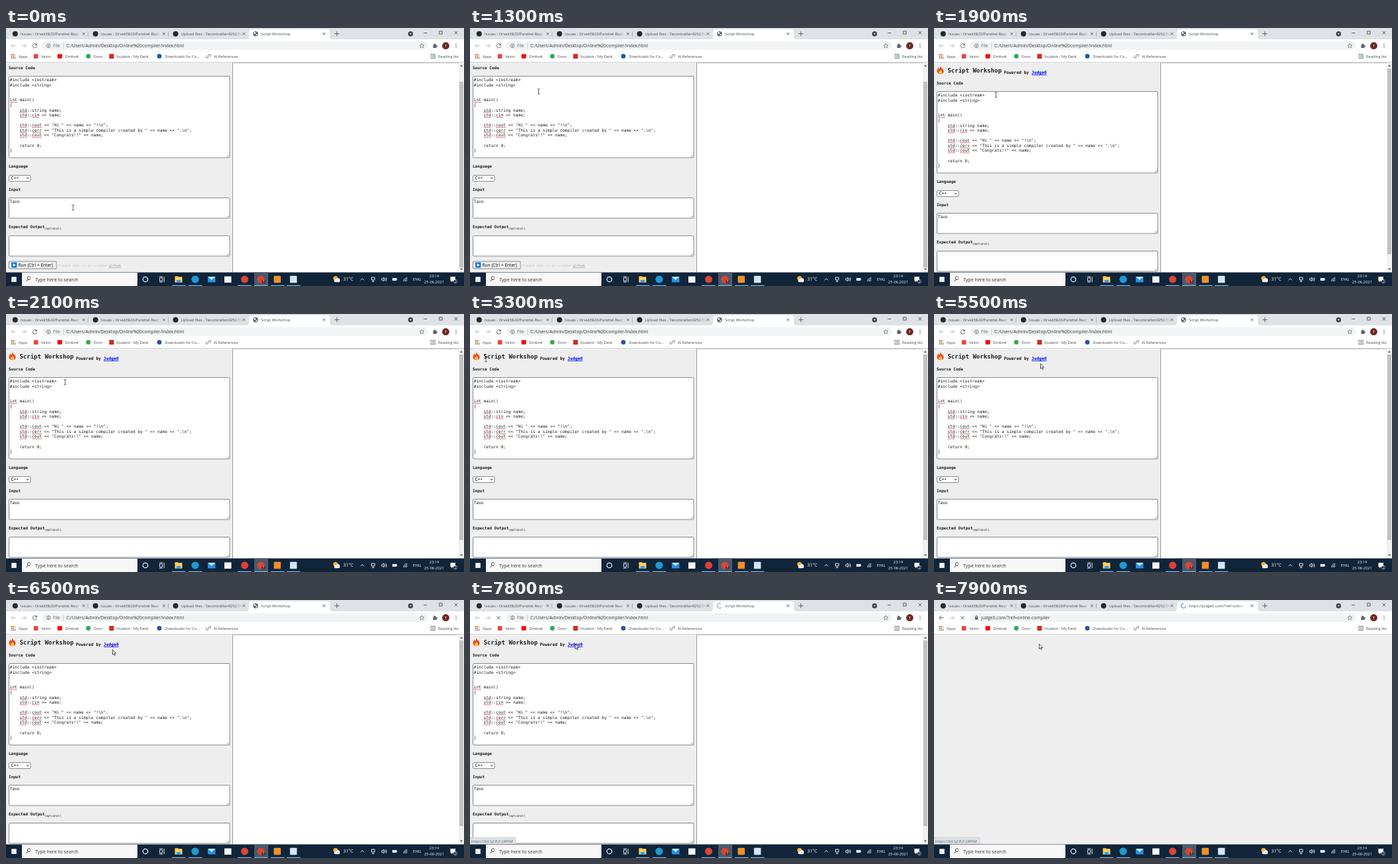
Animation, 690 px wide and 388 px high, one loop 8 s. Source, as an HTML page:

```html
<!DOCTYPE html>
<html lang="en">
<head>
<meta charset="utf-8">
<title>Script Workshop</title>
<style>
html, body { margin: 0; width: 100%; height: 100%; overflow: hidden; background: #fff; }
svg { display: block; width: 690px; height: 388px; }
text { font-family: "Open Sans", "Noto Sans", sans-serif; font-size: 5.78px; fill: #45494d; }
.url { font-size: 6.72px; fill: #333639; }
.mono { font-family: "DejaVu Sans Mono", "Noto Sans Mono", monospace; font-size: 6.16px; fill: #1c1c1c; }
.label { font-size: 6.03px; font-weight: bold; }
.line { fill: none; stroke: #5f6368; stroke-width: 1; }
.box { fill: #fff; stroke: #8a8a8a; stroke-width: 1; }
.tray { fill: #f2f5f8; }
.tray-line { fill: none; stroke: #f2f5f8; stroke-width: .9; }
</style>
</head>
<body>
<svg id="stage" viewBox="0 0 690 388">
  <defs>
    <linearGradient id="fadeTab"><stop offset="0" stop-color="#dee1e6" stop-opacity="0"/><stop offset="1" stop-color="#dee1e6"/></linearGradient>
    <linearGradient id="fadeActive"><stop offset="0" stop-color="#fff" stop-opacity="0"/><stop offset="1" stop-color="#fff"/></linearGradient>
    <clipPath id="view"><rect y="52" width="690" height="315.5"/></clipPath>
  </defs>
</svg>
<script>
const LOOP = 8000, STEP = 100, SCROLL = 23;
const HOVER = 7300, LOAD = 7500, NAVIGATE = 7900;

// Pointer hotspot: time, x, y
const POINTER = [
  [0, 101, 270], [300, 101, 270], [1000, 104, 100], [1300, 103.5, 95.5],
  [1600, 101, 97], [2100, 89, 102.5], [2500, 78, 100], [3000, 26, 70],
  [3300, 24, 68], [3800, 30, 66], [4700, 130, 68], [5300, 160.5, 74.8],
  [7000, 160.5, 74.8], [7400, 158.5, 66.2], [8000, 158.5, 66.2]
];
const WHEEL = [[0, SCROLL], [1500, SCROLL], [1800, 0], [LOOP, 0]];

const rect = (x, y, w, h, fill, r = 0, more = '') =>
  `<rect x="${x}" y="${y}" width="${w}" height="${h}" rx="${r}" fill="${fill}" ${more}/>`;
const dot = (x, y, r, fill, more = '') => `<circle cx="${x}" cy="${y}" r="${r}" fill="${fill}" ${more}/>`;
const line = (d, more = '') => `<path class="line" d="${d}" ${more}/>`;
const trayLine = d => `<path class="tray-line" d="${d}"/>`;
const shape = (d, fill, more = '') => `<path d="${d}" fill="${fill}" ${more}/>`;
const group = (id, body, more = '') => `<g id="${id}" ${more}>${body}</g>`;
const text = (x, y, s, cls = '', more = '') =>
  `<text x="${x}" y="${y}" class="${cls}" ${more}>${s.replace(/&/g, '&amp;').replace(/</g, '&lt;')}</text>`;
const mono = (x, y, s, more = '') => text(x, y, s, 'mono', more);
const label = (y, s) => text(4, y, s, 'mono label');
const cross = (x, y, r, more) => line(`M${x - r} ${y - r}l${2 * r} ${2 * r}m0 ${-2 * r}l${-2 * r} ${2 * r}`, more);

function tab(x, title, end) {
  return dot(x, 8.7, 4, '#24292e') + text(x + 8.3, 11, title) +
    rect(end - 15, 3, 12, 12, 'url(#fadeTab)') + rect(end - 3, 3, 9, 12, '#dee1e6') +
    cross(end, 8.7, 1.8, 'stroke-width=".8"') +
    (end < 300 ? rect(end + 6, 5, .6, 8, '#8a8e94') : '');
}

function tabs() {
  return rect(0, 0, 690, 17, '#dee1e6') +
    tab(13.8, 'Issues - Orvek5820/Pandrel-Rear', 117) +
    tab(134.8, 'Issues - Orvek5820/Pandrel-Rear', 238) +
    tab(255.5, 'Upload files - Tavomirellan4252/Rel', 358.5) +
    shape('M362 17Q366 17 366 13V6Q366 2 370 2H484Q488 2 488 6V13Q488 17 492 17Z', '#fff') +
    group('globe', dot(376, 8.7, 3.7, '#5f6368') +
      shape('M373.4 7.3l2-1.3 1.2 1.2-1.4 1.5-1.5 0zM376.5 9.3l2-.3-.6 2-1.5.6z', '#fff')) +
    group('spin', line('M376 5.2A3.5 3.5 0 1 0 379.5 8.7', 'id="arc"')) +
    text(384, 11, 'Script Workshop', '', 'id="title"') +
    rect(458, 3, 11, 12, 'url(#fadeActive)') + rect(469, 3, 16, 12, '#fff') +
    cross(479, 8.7, 1.8, 'stroke-width=".9"') +
    line('M495 8.7h7m-3.5-3.5v7') +
    dot(609.5, 8.7, 3.7, '#3c4043') + shape('M607.7 7.8h3.6l-1.8 2.4z', '#dee1e6') +
    line('M629.3 7.5h5M652.8 4.8h4.4v4.4h-4.4z', 'style="stroke:#222;stroke-width:.7"') +
    cross(678, 7.2, 2.4, 'style="stroke:#222;stroke-width:.7"');
}

function toolbar() {
  return rect(0, 17, 690, 35, '#fff') + rect(54, 20, 582, 13, '#f1f3f4', 6.5) +
    line('M14.5 26.7h-6.5m3-3l-3 3 3 3', 'id="back"') +
    line('M24 26.7h6.5m-3-3l3 3-3 3', 'style="stroke:#b9bcc0"') +
    group('reload', line('M45.6 24.6A3.1 3.1 0 1 0 46.4 27.4') + shape('M46.8 22.8v3.2h-3.2z', '#5f6368')) +
    group('stop', cross(43, 26.7, 2.7)) +
    group('fileUrl', dot(64, 26.7, 2.8, 'none', 'stroke="#5f6368" stroke-width=".8"') +
      line('M64 26.2v2.1M64 24.7v.8', 'stroke-width=".8"') +
      text(71, 29, 'File', 'url', 'style="fill:#5f6368"') + rect(86.5, 23, .6, 8, '#aeb1b5') +
      text(91, 29, 'C:/Users/Admin/Desktop/Online%20compiler/index.html', 'url')) +
    group('webUrl', rect(61.8, 25.8, 4.4, 3.8, '#5f6368', .5) +
      line('M62.7 26v-1a1.3 1.3 0 0 1 2.6 0v1', 'stroke-width=".8"') +
      text(71, 29, 'judge0.com/?ref=online-compiler', 'url')) +
    line('M626.5 23.3l1 2.2 2.4.2-1.8 1.6.5 2.4-2.1-1.2-2.1 1.2.5-2.4-1.8-1.6 2.4-.2z', 'style="stroke-width:.7"') +
    rect(643.5, 25, 5, 5, '#5f6368', .6) + dot(645.8, 24.6, 1.2, '#5f6368') + dot(648.7, 27.4, 1.2, '#5f6368') +
    dot(662.5, 26.7, 5.4, '#6b2a25') +
    text(662.5, 28.8, 'T', '', 'style="fill:#fff" text-anchor="middle"') +
    [24.2, 26.7, 29.2].map(y => dot(678, y, .75, '#5f6368')).join('');
}

function bookmarks() {
  const grid = ['#ea4335', '#ea4335', '#fbbc05', '#34a853', '#4285f4', '#fbbc05', '#34a853', '#4285f4', '#ea4335'];
  const items = [[53, 'Velmi'], [89, 'Zimbrel'], [132, 'Dorn'], [166, 'Student - My Desk'],
    [239.3, 'Downloads for Co...'], [313, 'AI References'], [651, 'Reading list']];
  return grid.map((c, i) => rect(7.6 + i % 3 * 2.5, 39.2 + (i / 3 | 0) * 2.5, 1.7, 1.7, c)).join('') +
    text(19, 44.6, 'Apps') + items.map(([x, s]) => text(x, 44.6, s)).join('') +
    rect(41.8, 39.3, 6.5, 6.5, '#ea4335') + rect(77.5, 39.2, 7, 6.5, '#f00', 1) +
    dot(124, 42.4, 3.4, '#34a853') + rect(155.5, 39, 7, 7, '#e1251b') + dot(231, 42.4, 3.4, '#2456a6') +
    line('M303.5 43.8l3-3M304.8 41.2l1-1a1.7 1.7 0 0 1 2.4 2.4l-1 1M305.2 43.6l-1 1a1.7 1.7 0 0 1-2.4-2.4l1-1', 'style="stroke-width:.8"') +
    line('M640.2 39.5h6.2v6h-6.2zM642 41.5h3M642 43.5h3', 'style="stroke-width:.8"') +
    rect(0, 51, 690, 1, '#d3d5d8');
}

function source(x, top) {
  const ADV = 3.708, GAP = 7.57;
  const rows = [
    '#include <iostream>', '#include <string>', '', '', 'int main()', '{',
    '    std::string name;', '    std::cin >> name;', '',
    '    std::cout << "Hi " << name << "!\\n";',
    '    std::cerr << "This is a simple compiler created by " << name << ".\\n";',
    '    std::cout << "Congrats!!" << name;', '', '    return 0;', '}'
  ];
  return rows.map((row, i) => {
    const y = top + i * GAP, pad = row.search(/\S|$/);
    const marks = [...row.matchAll(/\b(int|std|cin|cout|cerr)\b/g)]
      .map(m => rect(x + m.index * ADV, y + 1.1, m[0].length * ADV, .7, '#c8474c'));
    return mono(x + pad * ADV, y, row.trim()) + marks.join('');
  }).join('');
}

function area(y, h) {
  return `<rect class="box" x="4.5" y="${y}" width="332.5" height="${h}" rx="1"/>` +
    line(`M332.5 ${y + h - 1}l3.5-3.5M334.5 ${y + h - 1}l1.5-1.5`, 'style="stroke-width:.6"');
}

function page() {
  const left =
    shape('M9.4 57C10 60 14.8 61.5 14.6 65.5C14.4 68 12.2 69.3 9.6 69.3C6.5 69.3 4.5 67.5 4.5 64.8C4.5 62.5 6 61.3 6.2 59.3C7.2 60 7.6 60.9 7.7 61.8C9 60.6 9.5 59 9.4 57Z', '#e8501f') +
    shape('M9.8 62.5C10.2 64 12.4 64.8 12.2 67C12 68.5 11 69 9.6 69C8 69 6.9 68.2 7 66.6C7.1 65.5 7.8 65 8 64.3L8.9 65.2C9.6 64.4 9.9 63.6 9.8 62.5Z', '#fcc33c') +
    mono(20.4, 66.6, 'Script Workshop', 'style="font-size:9.03px;font-weight:bold"') +
    mono(105.2, 69.2, 'Powered by', 'style="font-size:6.3px;font-weight:bold"') +
    mono(147, 69.2, 'Judge0', 'style="font-size:6.3px;font-weight:bold;fill:#00e"') +
    rect(147, 70, 22.7, .8, '#00e') +
    label(85.1, 'Source Code') + area(95.5, 122.5) + source(5.7, 103.1) +
    label(233, 'Language') +
    `<rect class="box" x="4.5" y="244.5" width="32.5" height="9" rx="1"/>` +
    text(7.5, 251.3, 'C++', '', 'style="font-size:6.5px;fill:#000"') +
    line('M31 248l1.6 1.7 1.6-1.7', 'style="stroke:#111"') +
    label(268, 'Input') + area(278.5, 30.5) + mono(5.7, 286, 'Tavo') +
    label(323.5, 'Expected Output') + mono(58, 325.8, '(optional)', 'style="font-size:4.25px"') +
    area(335.5, 30.5) +
    rect(4.5, 374, 71.5, 11, '#efefef', 1, 'stroke="#8a8a8a"') +
    rect(8, 375.5, 8.5, 8, '#1c7bd0', 1) + shape('M10.7 377.2l4 2.3-4 2.3z', '#fff') +
    text(18.5, 382.2, 'Run (Ctrl + Enter)', '', 'style="font-size:6.6px;fill:#111"') +
    mono(80, 382, 'judge0-demo is an example', 'style="font-size:4.8px;fill:#c4c4c4"') +
    mono(155, 382, 'github', 'style="font-size:5px;fill:#999"') + rect(155, 383, 18, .6, '#999');
  return rect(0, 52, 690, 316, '#eee') + group('doc',
    group('scroll', left) +
    rect(341, 52, 341, 315.5, '#fff') + rect(341, 52, 1, 315.5, '#999') + rect(341, 52, 341, .8, '#aaa') +
    rect(682, 52, 8, 315.5, '#f1f1f1') + rect(683, 61, 6, 279, '#c1c1c1', 0, 'id="thumb"') +
    shape('M683.8 58h4.4l-2.2-2.6z', '#555') + shape('M683.8 361.5h4.4l-2.2 2.6z', '#555'));
}

const status = () => rect(-1, 357, 70, 11, '#dee1e6', 1.5, 'stroke="#c4c7cb" stroke-width=".6"') +
  text(2, 364.6, 'https://bit.ly/2UCsWRM', '', 'style="fill:#5f6368"');

function taskbar() {
  const NAVY = '#10243a', LIGHT = '#f2f5f8';
  const running = [250, 275, 349, 374, 399, 423].map(x => rect(x, 386.8, 20.5, 1.2, '#76b9ed')).join('');
  return rect(0, 367.5, 690, 20.5, NAVY) +
    rect(8.2, 374.3, 7.6, 7.6, LIGHT) +
    rect(24, 368, 174, 20, '#f7f7f7') +
    line('M36.9 375.4a2.4 2.4 0 1 0-.1 1.8M33.3 378.2l-2.6 2.8', 'style="stroke:#222;stroke-width:.9"') +
    text(44, 380.6, 'Type here to search', '', 'style="font-size:7.1px;fill:#333"') +
    dot(210, 378, 3.7, 'none', `stroke="${LIGHT}" stroke-width="1.2"`) +
    trayLine('M231.5 375.8h4.2v4.6h-4.2zM231 374h5.2M231 382.2h5.2M238.2 374v8.2') +
    rect(374, 367.5, 21, 20.5, '#4b5a6b') +
    rect(254.5, 373, 5, 3, '#e0a526', .5) + rect(254.5, 374.3, 11, 8.5, '#fbd05f', .5) + rect(257, 379, 6, 3.8, '#3c9be0') +
    dot(285, 378, 5.6, '#1e9bd0') +
    rect(304, 374, 11.5, 8.5, '#2a8fe0', .5) + shape('M304 374h11.5l-5.75 5z', '#bfe4fa') +
    rect(329, 373.5, 10.5, 9.5, LIGHT, .5) +
    dot(359.5, 378, 5.5, '#db4437') + dot(384, 378, 5.5, '#db4437') + dot(388, 381.5, 3, '#6b2a25') +
    text(388, 383.4, 'T', '', 'text-anchor="middle" style="font-size:4.5px;fill:#fff"') +
    rect(403.5, 372.7, 10.5, 10.5, '#f09022', 1) + rect(427.8, 372.7, 10.5, 10.5, '#d5e4f2', 1) + running +
    dot(496.5, 376.3, 3.4, '#f7b52c') + dot(496.5, 380, 2.3, '#e4ebf2') +
    dot(500, 379, 3, '#e4ebf2') + rect(496, 379, 7, 3.3, '#e4ebf2', 1.5) +
    text(508, 380.4, '31°C', 'tray', 'style="font-size:7px"') +
    trayLine('M534.2 379.3l2.6-2.6 2.6 2.6') +
    trayLine('M550.5 375h5v4h-5zM551.5 381.5h3M553 379v2.5') +
    trayLine('M566 376.8h1.4l1.8-1.8v6l-1.8-1.8h-1.4zM570.6 376.3a2.5 2.5 0 0 1 0 3.4M572 375a4 4 0 0 1 0 6') +
    rect(582, 376, 6.5, 4, LIGHT, .4) + rect(588.5, 377.2, .9, 1.6, LIGHT) +
    trayLine('M599 381a5.5 5.5 0 0 1 5.5-5.5M601 381a3.5 3.5 0 0 1 3.5-3.5M603 381a1.5 1.5 0 0 1 1.5-1.5') +
    text(613, 380.3, 'ENG', 'tray', 'style="font-size:6.1px"') +
    text(645, 375.4, '23:14', 'tray', 'text-anchor="middle"') +
    text(645, 384.4, '25-06-2021', 'tray', 'text-anchor="middle"') +
    shape('M669.5 374h7.5v6.5h-4l-1.8 2v-2h-1.7z', LIGHT) +
    dot(677, 381.2, 2.8, NAVY, `stroke="${LIGHT}" stroke-width=".5"`) +
    text(677, 382.9, '2', 'tray', 'text-anchor="middle" style="font-size:4.6px"');
}

const pointers = () =>
  group('beam', line('M-1.8-3.8h1.3l.5.4.5-.4h1.3M0-3.4v6.8M-1.8 3.8h1.3l.5-.4.5.4h1.3', 'style="stroke:#333;stroke-width:.8"')) +
  group('arrow', shape('M0 0V7.4L1.7 5.8 2.9 8.5 4.1 8 2.9 5.3H5.3Z', '#fff', 'stroke="#111" stroke-width=".7"'));

const stage = document.getElementById('stage');
stage.insertAdjacentHTML('beforeend',
  tabs() + toolbar() + bookmarks() +
  `<g clip-path="url(#view)">${page()}${group('status', status())}</g>` +
  taskbar() + pointers());

const part = Object.fromEntries([...stage.querySelectorAll('[id]')].map(el => [el.id, el]));
const show = (id, on) => part[id].setAttribute('visibility', on ? 'visible' : 'hidden');
const move = (id, x, y) => part[id].setAttribute('transform', `translate(${x} ${y})`);

function sample(keys, t) {
  const i = Math.max(1, keys.findIndex(k => k[0] >= t));
  const [a, b] = [keys[i - 1], keys[i]];
  const p = (t - a[0]) / (b[0] - a[0]), e = p * p * (3 - 2 * p);
  return a.slice(1).map((v, n) => v + (b[n + 1] - v) * e);
}

function overText(x, y, scroll) {
  const py = y + scroll;
  const inArea = [[95, 218], [278, 309], [335, 366]].some(([a, b]) => py > a && py < b);
  return (inArea && x < 337) || (py > 57 && py < 72 && x < 147);
}

function draw(t) {
  const [scroll] = sample(WHEEL, t), [x, y] = sample(POINTER, t);
  const loading = t >= LOAD, gone = t >= NAVIGATE, beam = overText(x, y, scroll);
  move('scroll', 0, -scroll);
  move('thumb', 0, scroll * 20 / SCROLL);
  move('beam', x, y);
  move('arrow', x, y);
  show('beam', beam);
  show('arrow', !beam);
  show('status', t >= HOVER);
  show('globe', !loading);
  show('spin', loading);
  show('reload', !loading);
  show('stop', loading);
  show('doc', !gone);
  show('fileUrl', !gone);
  show('webUrl', gone);
  part.title.textContent = gone ? 'https://judge0.com/?ref=online' : 'Script Workshop';
  part.back.style.stroke = gone ? '#5f6368' : '#b9bcc0';
  part.arc.style.stroke = gone ? '#3f7fdc' : '#9a9da1';
  part.spin.setAttribute('transform', `rotate(${(NAVIGATE - t) * .36} 376 8.7)`);
}

const start = performance.now();
function tick() {
  const t = (performance.now() - start) % LOOP;
  draw(Math.floor(t / STEP) * STEP);
  requestAnimationFrame(tick);
}
tick();
</script>
</body>
</html>
```
